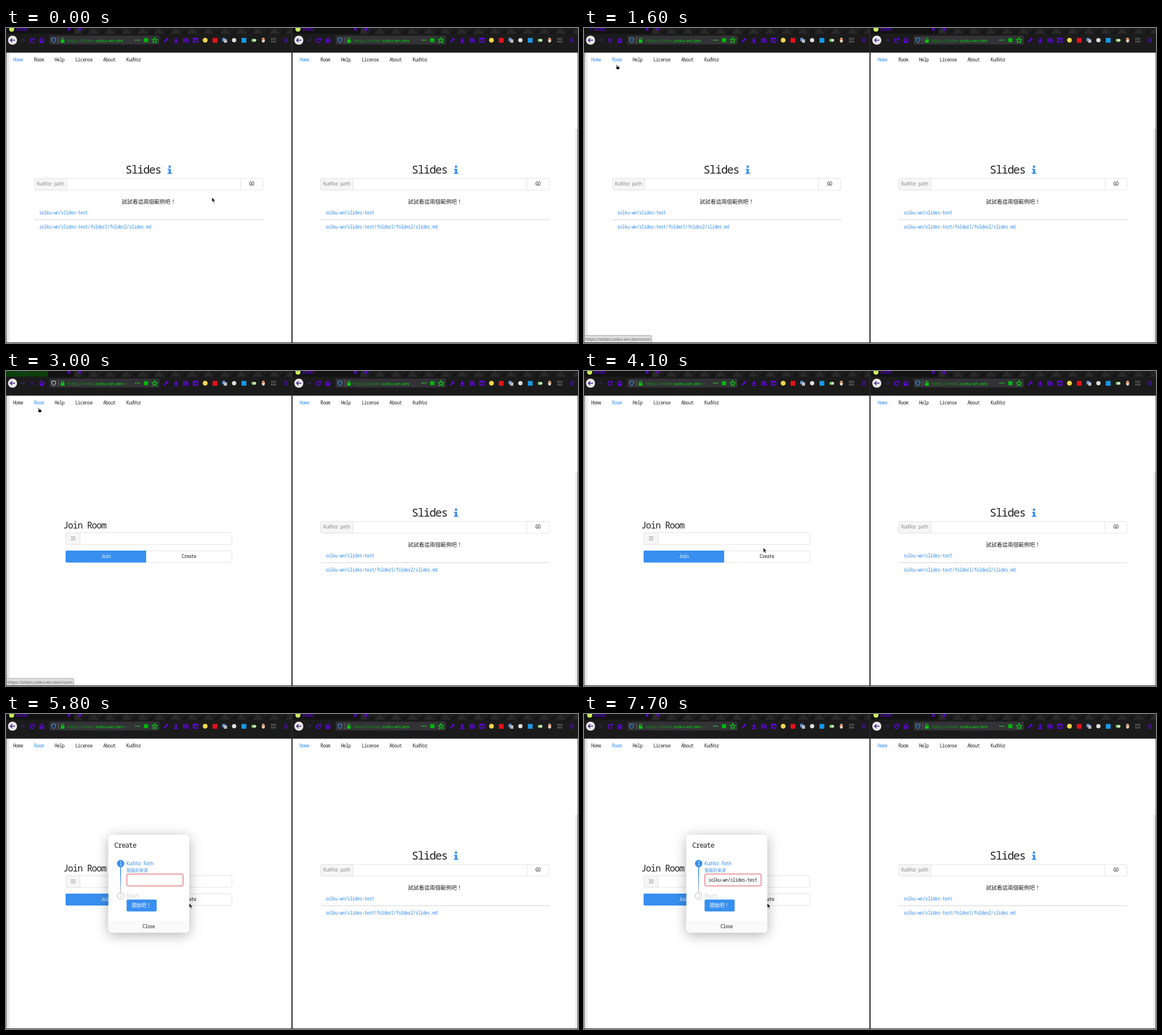
An HTML page for the animation above (8 s loop, 1008 px wide and 556 px high).

```html
<!DOCTYPE html>
<html lang="zh-Hant">
<head>
<meta charset="utf-8">
<title>Slides</title>
<style>
  html, body { margin: 0; width: 100%; height: 100%; overflow: hidden; background: #fff; }
  svg { display: block; width: 1008px; height: 556px; }
  text { font: 8.1px "Noto Sans Mono", monospace; letter-spacing: -.071em; fill: #222; white-space: pre; }
  .ui { font: 7.48px "Noto Sans", "Noto Sans CJK TC", sans-serif; letter-spacing: 0; }
  .url { font-size: 7.88px; fill: #129312; }
  .host { fill: #00e408; }
  .cjk { font: 500 9.55px "Noto Sans CJK TC", "Noto Sans CJK SC", "Noto Sans CJK JP", sans-serif; letter-spacing: 0; }
  .mid { text-anchor: middle; }
  .blue { fill: #388ff0; }
  .gray { fill: #8b8b8b; }
  .pale { fill: #c9c9c9; }
  .white { fill: #fff; }
  .box { fill: #fff; stroke: #e4e4e4; }
  .addon { fill: #f6f6f6; stroke: #e4e4e4; }
  .line { fill: none; stroke: #6a00ff; stroke-width: 1.4; }
  .green { fill: none; stroke: #00d808; stroke-width: 1.2; }

  /* One loop is 8 s, so 1% is 80 ms. */
  .a { animation: 8s step-end infinite; }
  .old { animation-name: old; }
  .new { opacity: 0; animation-name: new; }
  .home { animation-name: home; }
  .room { animation-name: room; }
  .idle { animation-name: idle; }
  .icon { animation-name: icon; }
  .dot { opacity: 0; animation-name: dot; }
  .stop { opacity: 0; animation-name: stop; }
  .path { opacity: 0; animation-name: path; }
  .shield { opacity: 0; animation-name: shield; }
  .burst { opacity: 0; animation-name: burst; }
  .link { opacity: 0; animation-name: link; }
  .wait { opacity: 0; animation-name: wait; }
  .create { animation-name: create; }
  .modal { opacity: 0; animation-name: modal; }
  .focus { opacity: 0; animation-name: focus; }
  .list { opacity: 0; animation-name: list; }
  .typed { width: 0; animation-name: typed; }
  .caret { opacity: 0; animation-name: caret; }
  .pointer { animation-name: pointer; }
  .arrow { animation-name: arrow; }
  .hand { opacity: 0; animation-name: hand; }

  @keyframes old { 0% { opacity: 1 } 36.25% { opacity: 0 } }
  @keyframes new { 36.25% { opacity: 1 } 100% { opacity: 1 } }
  @keyframes home { 0% { fill: #388ff0 } 36.25% { fill: #222 } }
  @keyframes room {
    0% { fill: #222 } 7.5% { fill: #28415e } 8.75% { fill: #3070b5 }
    11.25% { fill: #388ff0 } 100% { fill: #388ff0 }
  }
  @keyframes idle { 0% { opacity: 1 } 16.25% { opacity: 0 } 48.75% { opacity: 1 } }
  @keyframes icon { 0% { opacity: 1 } 15% { opacity: 0 } 48.75% { opacity: 1 } }
  @keyframes dot {
    15% { opacity: 1; transform: translateX(7px) }
    17.5% { opacity: 1; transform: translateX(11px) }
    22.5% { opacity: 1; transform: translateX(6px) }
    26.25% { opacity: 1; transform: translateX(9px) }
    30% { opacity: 1; transform: translateX(6px) }
    33.75% { opacity: 1; transform: translateX(12px) }
    35% { opacity: 1; transform: translateX(9px) }
    37.5% { opacity: 0 }
  }
  @keyframes stop { 16.25% { opacity: 1 } 37.5% { opacity: .4 } 48.75% { opacity: 0 } }
  @keyframes path { 22.5% { opacity: 1 } 100% { opacity: 1 } }
  @keyframes shield { 22.5% { opacity: 1 } 48.75% { opacity: 0 } }
  @keyframes burst { 37.5% { opacity: 1 } 48.75% { opacity: 0 } }
  @keyframes link { 16.25% { opacity: 1 } 22.5% { opacity: 0 } 36.25% { opacity: 1 } 48.75% { opacity: 0 } }
  @keyframes wait { 22.5% { opacity: 1 } 36.25% { opacity: 0 } }
  @keyframes create { 0% { fill: #222 } 55% { fill: #388ff0 } 63.75% { fill: #222 } }
  @keyframes modal {
    63.75% { opacity: .98; transform: translateY(-1px) }
    67.5% { opacity: 1; transform: none }
    100% { opacity: 1; transform: none }
  }
  @keyframes focus { 72.5% { opacity: 1 } 100% { opacity: 1 } }
  @keyframes list { 83.75% { opacity: 1 } 96.25% { opacity: 0 } }
  @keyframes typed {
    83.75% { width: 4.4px } 88.75% { width: 17.2px } 91.25% { width: 21.5px }
    96.25% { width: 90px } 100% { width: 90px }
  }
  @keyframes caret {
    83.75% { opacity: 1; transform: translateX(4.3px) }
    88.75% { opacity: 1; transform: translateX(17.1px) }
    91.25% { opacity: 1; transform: translateX(21.4px) }
    96.25% { opacity: 0 }
  }
  @keyframes pointer {
    0% { transform: translate(363px, 299px) }
    2.5% { transform: translate(255px, 200px) }
    3.75% { transform: translate(118px, 104px) }
    5% { transform: translate(46px, 62px) }
    15% { transform: translate(51px, 62px) }
    16.25% { transform: translate(53px, 63px) }
    17.5% { transform: translate(55px, 64px) }
    18.75% { transform: translate(56px, 64px) }
    48.75% { transform: translate(240px, 234px) }
    51.25% { transform: translate(316px, 312px) }
    55% { transform: translate(323px, 334px) }
    100% { transform: translate(323px, 334px) }
  }
  @keyframes arrow { 0% { opacity: 1 } 5% { opacity: 0 } 48.75% { opacity: 1 } 55% { opacity: 0 } 63.75% { opacity: 1 } }
  @keyframes hand { 5% { opacity: 1 } 48.75% { opacity: 0 } 55% { opacity: 1 } 63.75% { opacity: 0 } }
</style>
</head>
<body>
<svg viewBox="0 0 1008 556" xmlns="http://www.w3.org/2000/svg">
  <defs>
    <pattern id="tri" width="29" height="10" patternUnits="userSpaceOnUse">
      <path d="M0 0H29V10H0Z" fill="#1d1d1d"/>
      <path d="M0 10L9 0L18 10Z" fill="#292929"/>
      <path d="M18 10L29 0V10Z" fill="#161616"/>
    </pattern>
    <linearGradient id="edge"><stop stop-color="#d5d5d5"/><stop offset="1" stop-color="#fff"/></linearGradient>
    <linearGradient id="step" x2="0" y2="1"><stop offset=".2" stop-color="#388ff0"/><stop offset="1" stop-color="#ccc"/></linearGradient>
    <linearGradient id="fade"><stop stop-color="#333337" stop-opacity="0"/><stop offset="1" stop-color="#333337"/></linearGradient>
    <filter id="shadow" x="-30%" y="-30%" width="160%" height="160%">
      <feDropShadow dx="0" dy="4" stdDeviation="11" flood-opacity=".3"/>
    </filter>
    <clipPath id="type"><rect class="a typed" x="219.5" y="284" height="18"/></clipPath>

    <g id="chrome">
      <path d="M0 0H503.5V43.500H0Z" fill="#1b1b1b"/>
      <path d="M120 0H503.5V10H120Z" fill="url(#tri)"/>
      <path d="M0 0H120V10H0Z" fill="#121212"/>
      <path class="line" d="M109 0L113.500 4.500M113.500 0L109 4.500M126 2H134M130 0V6" stroke-width="1"/>
      <text class="ui" x="17" y="5" style="font-size:8px;fill:#6a00ff">Slides</text>
      <circle cx="11.500" cy="21.500" r="8" fill="#e9e9e9"/>
      <path d="M16 21.500H8M11 18L7.500 21.500L11 25" fill="none" stroke="#3d1d86" stroke-width="1.400"/>
      <path d="M25 21.500H32M29.500 18L33 21.500L29.500 25" fill="none" stroke="#35234f" stroke-width="1.300"/>
      <path class="line" d="M58.500 22L63 17.500L67.500 22M60 21.500V25.500H62V23H64V25.500H66V21.500"/>
      <rect x="76.500" y="13.500" width="194" height="15.500" rx="2" fill="#333337"/>
      <path d="M84 17.500L87.500 18.500Q88 23.500 84 26Q80 23.500 80.500 18.500Z" fill="#24364d" stroke="#5aa0f0"/>
      <path d="M92.500 16V27" stroke="#666"/>
      <rect x="96.500" y="21" width="6.500" height="5" rx=".5" fill="#00c808"/>
      <path class="green" d="M97.800 21V19.500Q97.800 17.800 99.700 17.800T101.700 19.500V21"/>
      <text class="ui url" x="108" y="24.500">https://slides.<tspan class="host">solku-wn.dev</tspan></text>
      <path d="M227.500 21.500H236" stroke="#00d808" stroke-width="2" stroke-dasharray="2 1.200"/>
      <rect x="243" y="18" width="7.500" height="7" rx="1" fill="#00b808"/>
      <path class="green" d="M262 17L263.400 20.100L266.500 20.400L264.200 22.600L264.900 25.900L262 24.200L259.100 25.900L259.800 22.600L257.500 20.400L260.600 20.100Z"/>
      <g class="line">
        <path d="M278.500 25L283 20.500" stroke-width="2"/>
        <path d="M284.500 17.500L282.500 19.500L284 21L286 19.500"/>
        <path d="M299.500 17V23M296.500 20.500L299.500 23.500L302.500 20.500M295.500 25.500H303.500"/>
        <path d="M313 17.500V26M315.500 17.500V26M318 17.500V26M319.500 18L321.500 26"/>
        <path d="M330 18H338V25H330ZM333 18V25M330 19H338"/>
        <path d="M489.500 18.500H496.500M489.500 21.500H496.500M489.500 24.500H496.500" stroke-width="1.200"/>
      </g>
      <circle cx="351" cy="21.500" r="4.300" fill="#f3d64e"/>
      <rect x="364" y="17.500" width="8.500" height="8.500" rx="1" fill="#e3121b"/>
      <rect x="381" y="17.500" width="5.500" height="6" fill="#6692d5"/>
      <rect x="384" y="20" width="5.500" height="6" fill="#b8bcc2"/>
      <circle cx="402" cy="21.500" r="3.800" fill="#dedede"/>
      <rect x="415" y="17.500" width="8.500" height="8.500" fill="#1798e6"/>
      <rect x="432.500" y="19" width="8.500" height="5.500" rx="2.700" fill="#7cc56a"/>
      <circle cx="438" cy="21.700" r="1.900" fill="#eee"/>
      <ellipse cx="453.500" cy="21.500" rx="2.700" ry="4.300" fill="#ead3c0"/>
      <path d="M451 20H456" stroke="#d77440" stroke-width="2"/>
      <path d="M467 19H476M467 24H476" stroke="#555" stroke-width="3.500" stroke-dasharray="2.400 .8"/>
    </g>

    <g id="reload">
      <path class="line" d="M49 19.500A3.700 3.700 0 1 0 49.800 22.500"/>
      <path d="M50.500 17V21H46.500Z" fill="#6a00ff"/>
    </g>

    <circle id="favicon" cx="10" cy="2" r="4.500" fill="#c8ee5a"/>

    <g id="nav">
      <text x="85.700" y="59.200">Help</text>
      <text x="122.300" y="59.200">License</text>
      <text x="171.300" y="59.200">About</text>
      <text x="212" y="59.200">KudVor</text>
    </g>

    <g id="start">
      <text x="210.500" y="257.200" style="font-size:19.66px">Slides</text>
      <g class="blue">
        <circle cx="288.500" cy="244.800" r="2.200"/>
        <path d="M285 248.500H290.500V255.500H292.500V257.500H284.700V255.500H286.700V250.500H285Z"/>
      </g>
      <rect class="box" x="50.500" y="265.500" width="402" height="20.500" rx="2"/>
      <path class="addon" d="M107 265.500H52.500Q50.500 265.500 50.500 267.500V284Q50.500 286 52.500 286H107Z"/>
      <path d="M413.500 266V286" stroke="#e4e4e4"/>
      <text class="gray" x="54.800" y="278.400">KudVor path</text>
      <text class="mid" x="432.700" y="278.400">GO</text>
      <text class="cjk" x="204" y="310">試試看這兩個範例吧！</text>
      <text class="blue" x="58.500" y="328.600">solku-wn/slides-test</text>
      <path d="M50 338.500H453" stroke="#d4d4d4"/>
      <text class="blue" x="58.500" y="353.800">solku-wn/slides-test/folder1/folder2/slides.md</text>
    </g>
  </defs>

  <path d="M0 0H1008V556H0Z" fill="#fff"/>
  <path d="M1 43H8V556H1Z" fill="url(#edge)"/>
  <path d="M0 178H6V555H0Z" fill="url(#edge)" transform="matrix(-1 0 0 1 1008 0)"/>

  <!-- right window -->
  <g transform="translate(504.500)">
    <use href="#chrome"/>
    <use href="#reload"/>
    <use href="#favicon"/>
    <text class="blue" x="12.800" y="59.200">Home</text>
    <text x="49.500" y="59.200">Room</text>
    <use href="#nav"/>
    <use href="#start"/>
  </g>

  <!-- left window -->
  <use href="#chrome"/>
  <g class="a idle"><use href="#reload"/></g>
  <path class="a stop line" d="M42.500 18L49.500 25M49.500 18L42.500 25"/>
  <g class="a path">
    <text class="ui url" x="206.500" y="24.500">/ro</text>
    <path d="M204 15H222V28H204Z" fill="url(#fade)"/>
  </g>
  <path class="a shield" d="M84 17.500L87.500 18.500Q88 23.500 84 26Q80 23.500 80.500 18.500Z" fill="#333337" stroke="#e0e0e0"/>
  <g class="a icon"><use href="#favicon"/></g>
  <circle class="a dot" cy="2" r="1.200" fill="#5a00d8"/>
  <path class="a burst" d="M0 0H74V10H0Z" fill="#0c480c" fill-opacity=".85"/>
  <text class="a home" x="12.800" y="59.200">Home</text>
  <text class="a room" x="49.500" y="59.200">Room</text>
  <use href="#nav"/>
  <g class="a old"><use href="#start"/></g>

  <g class="a new">
    <text x="100.700" y="278.300" style="font-size:15.9px">Join Room</text>
    <rect class="box" x="105.500" y="285.500" width="292.500" height="20.500" rx="2"/>
    <path class="addon" d="M130.500 285.500H107.500Q105.500 285.500 105.500 287.500V304Q105.500 306 107.500 306H130.500Z"/>
    <text class="gray mid" x="117.700" y="298.600">ID</text>
    <rect class="box" x="105.500" y="317.500" width="292.500" height="20.500" rx="2"/>
    <path class="blue" d="M247 317H107Q105 317 105 319V336Q105 338 107 338H247Z"/>
    <text class="white mid" x="175.800" y="330.400">Join</text>
    <text class="a create mid" x="322.300" y="330.400">Create</text>
  </g>

  <g class="a link">
    <path d="M-1 542.500H117.500Q119.500 542.500 119.500 544.500V556H-1Z" fill="#dcdcdc" stroke="#b2b2b2"/>
    <text class="ui" x="2" y="551.500" style="fill:#666">https://slides.solku-wn.dev/room</text>
  </g>
  <g class="a wait">
    <path d="M-1 542.500H163.500Q165.500 542.500 165.500 544.500V556H-1Z" fill="#c6c6c6" stroke="#a6a6a6"/>
    <text class="ui" x="2" y="551.500">等待 slides.solku-wn.dev…</text>
  </g>

  <!-- create dialog -->
  <g class="a modal">
    <rect x="180.500" y="213" width="142.500" height="173" rx="8" fill="#fff" filter="url(#shadow)"/>
    <path d="M180.500 365H323V378Q323 386 315 386H188.500Q180.500 386 180.500 378Z" fill="#fafafa"/>
    <text x="190.800" y="236" style="font-size:12.15px">Create</text>
    <path d="M201.200 270H202.800V315H201.200Z" fill="url(#step)"/>
    <circle class="blue" cx="202" cy="264" r="6.500"/>
    <text class="white mid" x="201.800" y="266.700">1</text>
    <circle cx="202" cy="321" r="5.800" fill="#fff" stroke="#ccc" stroke-width="1.300"/>
    <text class="pale mid" x="201.800" y="323.700">2</text>
    <text class="blue" x="212.300" y="266.900">KudVor Path</text>
    <text class="cjk blue" x="212.500" y="279" style="font-size:7.5px">簡報的來源</text>
    <rect class="box" x="213" y="282.500" width="99" height="21" rx="2"/>
    <text class="pale" x="212.300" y="323.900">Start</text>
    <rect class="blue" x="212.500" y="327.500" width="53" height="21" rx="2"/>
    <text class="cjk white" x="221.500" y="341" style="font-size:8.6px">開始吧！</text>
    <text class="mid" x="251.300" y="378">Close</text>
    <rect class="a focus" x="213" y="282.500" width="99" height="21" rx="2" fill="none" stroke="#df4a58"/>
    <g clip-path="url(#type)"><text x="219.300" y="295.700">solku-wn/slides-test</text></g>
    <path class="a caret" d="M220 288.500V297.500" stroke="#222" stroke-width=".8"/>
    <g class="a list">
      <rect x="212.500" y="303.500" width="98.500" height="12" fill="#fff" stroke="#aaa"/>
      <text class="ui" x="216" y="312.300">solku-wn/slides-test</text>
    </g>
  </g>

  <!-- window frames -->
  <path d="M503 0H505V556H503ZM0 555H1008V556H0ZM0 43H.6V556H0ZM1007.400 43H1008V556H1007.400Z" fill="#262626"/>

  <g class="a pointer" stroke="#fff" stroke-width=".5" fill="#111">
    <path class="a arrow" d="M0 0V8L1.900 6.400L3.300 9.500L4.700 8.900L3.300 5.900H5.800Z"/>
    <path class="a hand" d="M.8 1.200Q1.500 .3 2.200 1.200L2.800 3.700L5.500 4.100Q6.600 4.500 6.600 5.800L6.200 9H1.700L.2 6.300Q.2 5 1.400 5.400Z"/>
  </g>
</svg>
</body>
</html>
```
